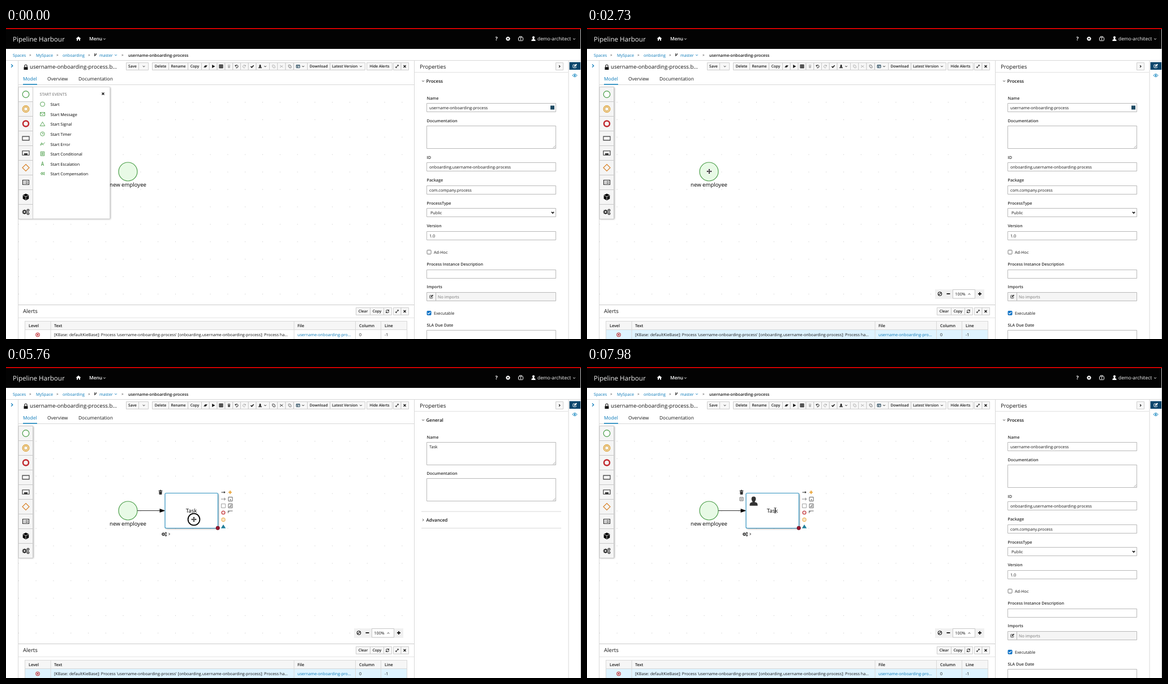
Write an HTML page with a canvas that moves like this. It is 1016 px wide and 551 px high and loops after 8 s.

```html
<!DOCTYPE html>
<html lang="en">
<head>
<meta charset="utf-8">
<title>Process designer</title>
<style>
html, body { margin: 0; width: 100%; height: 100%; overflow: hidden; background: #fff; }
canvas { display: block; width: 1016px; height: 551px; }
</style>
</head>
<body>
<canvas id="stage" width="1016" height="551"></canvas>
<script>
const ctx = document.getElementById('stage').getContext('2d');
const LOOP = 8000;
const INK = '#161616', GREY = '#bbb', LINK = '#0878b8', BLUE = '#1b8ac2';
const GREEN = '#4b9e49', ORANGE = '#e9a02c', RED = '#c0272d';
ctx.textRendering = 'geometricPrecision';

// --- helpers ---
function text(s, x, cy, { size = 7.2, color = INK, weight = 400, align = 'left' } = {}) {
  ctx.font = `${weight} ${size}px "Open Sans", "Noto Sans", sans-serif`;
  ctx.textAlign = align;
  ctx.fillStyle = color;
  ctx.fillText(s, x, cy + size * 0.36);
}
function fill(x, y, w, h, color) {
  ctx.fillStyle = color;
  ctx.fillRect(x, y, w, h);
}
function box(x, y, w, h, { bg, line, r = 0, lw = 1 } = {}) {
  ctx.beginPath();
  ctx.roundRect(x, y, w, h, r);
  if (bg) { ctx.fillStyle = bg; ctx.fill(); }
  if (line) { ctx.strokeStyle = line; ctx.lineWidth = lw; ctx.stroke(); }
}
function shadow(draw, blur = 3, color = 'rgba(0,0,0,.4)') {
  ctx.save();
  ctx.shadowColor = color;
  ctx.shadowBlur = blur;
  ctx.shadowOffsetX = ctx.shadowOffsetY = 1.2;
  draw();
  ctx.restore();
}
function icon(x, y, d, { line, bg, lw = 1, dash = [], scale = 1 } = {}) {
  const path = new Path2D(d);
  ctx.save();
  ctx.translate(x, y);
  ctx.scale(scale, scale);
  ctx.setLineDash(dash);
  if (bg) { ctx.fillStyle = bg; ctx.fill(path); }
  if (line) { ctx.strokeStyle = line; ctx.lineWidth = lw; ctx.stroke(path); }
  ctx.restore();
}
function ring(x, y, r, line, lw = 1, bg) {
  ctx.beginPath();
  ctx.arc(x, y, r, 0, Math.PI * 2);
  if (bg) { ctx.fillStyle = bg; ctx.fill(); }
  if (line) { ctx.strokeStyle = line; ctx.lineWidth = lw; ctx.stroke(); }
}
const hline = (x0, x1, y, color = '#d8d8d8') => fill(x0, y, x1 - x0, 1, color);
const vline = (x, y0, y1, color = '#d8d8d8') => fill(x, y0, 1, y1 - y0, color);

const D = {
  down: 'M-1.8-.9 0 .9 1.8-.9',
  up: 'M-1.8.9 0-.9 1.8.9',
  right: 'M-.9-1.9.9 0-.9 1.9',
  home: 'M-4.5 0 0-4 4.5 0H3V3.5H1V1H-1V3.5H-3V0Z',
  user: 'M-2-2.2a2 2.2 0 1 1 4 0C2-.8 1 0 1 .7 3.3 1.2 3.6 2 3.6 4H-3.6C-3.6 2-3.3 1.2-1 .7-1 0-2-.8-2-2.2Z',
  trash: 'M-3.4-3.2H-1.2V-4.2H1.2V-3.2H3.4V-2.1H-3.4ZM-2.8-1.4H2.8L2.3 4H-2.3Z',
  close: 'M-2-2 2 2M2-2-2 2',
  expand: 'M-2.2 2.2 2.2-2.2M.4-2.2H2.2V-.4M-2.2.4V2.2H-.4',
  check: 'M-2.6 0-.8 1.8 2.6-1.8',
  plus: 'M-3 0H3M0-3V3',
  arrow: 'M-3.5-.5H1V-2L3.8 0 1 2V.5H-3.5Z',
  page: 'M-2.4-2.4H.8V-.8H2.4V2.6H-.8V.8H-2.4Z',
  rows: 'M-3-3H3V3H-3ZM-1.6-1H1.6M-1.6 1H1.6',
  list: 'M-5.5-4H5.5V4H-5.5ZM-3.5-1.5H-2.2M-.8-1.5H3.7M-3.5 1.4H-2.2M-.8 1.4H3.7',
  note: 'M-4 2V-2H4M-2.5 0V-2',
  undo: 'M-2.3-2.4V-.5H-.4M-2.2-.6A2.4 2.4 0 1 1-1.5 1.9',
  redo: 'M2.3-2.4V-.5H.4M2.2-.6A2.4 2.4 0 1 0 1.5 1.9'
};

function gear(x, y, r, color = INK, hole = '#fff') {
  ctx.strokeStyle = color;
  ctx.lineWidth = r * 0.45;
  for (let i = 0; i < 8; i++) {
    const a = i * Math.PI / 4;
    ctx.beginPath();
    ctx.moveTo(x, y);
    ctx.lineTo(x + Math.cos(a) * r, y + Math.sin(a) * r);
    ctx.stroke();
  }
  ring(x, y, r * 0.75, null, 0, color);
  ring(x, y, r * 0.36, null, 0, hole);
}
function gears(x, y, s = 1) {
  gear(x - 1.8 * s, y + .3 * s, 3.3 * s, '#333');
  gear(x + 3.2 * s, y - 2 * s, 2 * s, '#333');
  gear(x + 3.2 * s, y + 2.6 * s, 2 * s, '#333');
}
function pencil(x, y, color, scale = 1) {
  icon(x, y, 'M.6-2.4H-2.2Q-3-2.4-3-1.6V2Q-3 2.8-2.2 2.8H1.6Q2.4 2.8 2.4 2V.8', { line: color, lw: .9, scale });
  icon(x, y, 'M-1.2 1.2-.9-.6 2.3-3.8 3.8-2.3.6.9Z', { bg: color, scale });
}

// --- page chrome ---
function header() {
  fill(0, 0, 1016, 37, '#030303');
  fill(0, 0, 1016, 1.9, '#d10000');
  text('Pipeline Harbour', 12, 19.5, { size: 11.6, color: '#f2f2f2' });
  icon(128, 19, D.home, { bg: '#fff' });
  text('Menu', 147, 19, { size: 8.4, color: '#fff', weight: 600 });
  icon(174, 19.5, D.down, { line: '#fff' });
  text('?', 864.5, 19, { size: 9, color: '#fff', weight: 700 });
  gear(887, 19, 3.8, '#fff', '#030303');
  box(905.5, 16.5, 8, 6, { line: '#fff', r: 1 });
  box(907.5, 15, 4, 1.5, { line: '#fff', lw: .8 });
  icon(909.5, 19.5, D.plus, { line: '#fff', scale: .6 });
  icon(932, 19, D.user, { bg: '#fff' });
  text('demo-architect', 939, 19, { size: 8.4, color: '#fff' });
  icon(1004, 19.5, D.down, { line: '#fff' });
}
function breadcrumbs() {
  for (const [s, x] of [['Spaces', 12], ['MySpace', 53], ['onboarding', 100], ['master', 165]])
    text(s, x, 48, { color: LINK });
  for (const x of [41, 89, 145, 204]) text('»', x, 47.5, { color: '#555' });
  icon(158, 47.5, 'M-1.3-2.6V2.6M-1.3 1.2C1.3 1 1.5-.5 1.5-2.4', { line: '#333', lw: 1.2 });
  icon(194, 48, D.down, { line: LINK, lw: .9 });
  text('username-onboarding-process', 216, 48, { weight: 600 });
  hline(0, 1016, 57);
}
function button(x0, x1, y, label, textX) {
  box(x0 + .5, y + .5, x1 - x0, 13, { bg: '#f7f7f7', line: '#c4c4c4', lw: .8 });
  if (label) text(label, textX ?? (x0 + x1) / 2 + .5, y + 7, { size: 6.6, weight: 600, align: textX ? 'left' : 'center' });
}
function toolbar(selected) {
  icon(35, 70, 'M-3.5-.8H3.5V4H-3.5Z', { bg: INK });
  icon(35, 69, 'M-2 .5V-2a2 2 0 0 1 4 0V.5', { line: INK, lw: 1.2 });
  text('username-onboarding-process.b...', 42, 68.5, { size: 9.6 });

  button(212, 234, 61, 'Save');
  button(234, 251, 61);
  button(258, 287, 61, 'Delete');
  button(287, 321, 61, 'Rename');
  button(321, 345, 61, 'Copy');
  for (let i = 0; i < 7; i++) button(345 + i * 13.8, 358.8 + i * 13.8, 61);
  button(441.6, 465, 61);
  for (let i = 0; i < 3; i++) button(465 + i * 14.2, 479.2 + i * 14.2, 61);
  button(508, 532, 61);
  button(532, 572, 61, 'Download');
  button(572, 634, 61, 'Latest Version', 576);
  button(637, 682, 61, 'Hide Alerts');
  button(684, 697.5, 61);
  button(697.5, 711, 61);

  const active = selected ? '#555' : GREY;
  for (const x of [243.5, 458, 525, 627]) icon(x, 68, D.down, { line: INK, lw: .9 });
  icon(352.5, 68, 'M-3.3 1.8-.8-1.8H3.3L.8 1.8Z', { bg: INK });
  icon(366.5, 68, 'M-2.4-3 3 0-2.4 3Z', { bg: INK });
  icon(380, 68, 'M-3-2.6H3V2.6H-3ZM-3 0H3M-1-2.6V2.6M1-2.6V2.6', { line: INK, lw: 1.1 });
  icon(394, 68, D.trash, { bg: active, scale: .75 });
  icon(407.5, 68, D.undo, { line: INK });
  icon(421, 68, D.redo, { line: '#aaa' });
  icon(435, 68, D.check, { line: INK, lw: 1.5 });
  icon(449, 68, 'M-1-3H1V-.5H2.5L0 2-2.5-.5H-1ZM-3 1.8H3V3H-3Z', { bg: INK });
  icon(473, 68, D.page, { line: active });
  icon(487, 68, 'M-2.3-2 2.5 2M-2.3 2 2.5-2M-3-1.2h1.4M-3 1.2h1.4', { line: active });
  icon(501.5, 68, D.page, { line: '#888' });
  icon(516, 68, 'M-3-2.4H3V2.4H-3ZM-3-.8H3M-.8-.8V2.4', { line: '#24475c' });
  icon(691, 68, D.expand, { line: INK });
  icon(704.5, 68, D.close, { line: INK, lw: 1.3 });

  text('Model', 30, 90, { size: 8.4, color: LINK });
  text('Overview', 73, 90, { size: 8.4 });
  text('Documentation', 128, 90, { size: 8.4 });
  hline(22, 721, 100);
  fill(30, 99, 25, 1.6, BLUE);
}
function sideStrips() {
  icon(10.5, 67, 'M-1.3-2.6 1.3 0-1.3 2.6', { line: LINK, lw: 1.3 });
  vline(21, 58, 551);
  vline(721, 58, 551);
  vline(993.5, 58, 551);
  fill(995.5, 60.5, 19.5, 13.5, '#0b456b');
  pencil(1005, 67.5, '#fff', 1.05);
  icon(1005, 84, 'M-4 0C-2-3.3 2-3.3 4 0 2 3.3-2 3.3-4 0Z', { line: BLUE });
  ring(1005, 84, 1.5, null, 0, BLUE);
  vline(1015, 2, 551, '#c4c4c4');
}
function alerts(hover) {
  fill(22, 490, 699, 61, '#fff');
  hline(22, 721, 490, '#ccc');
  text('Alerts', 30, 502, { size: 9.6 });
  button(618, 643, 495, 'Clear');
  button(643, 667, 495, 'Copy');
  button(667, 681, 495);
  button(684, 697.5, 495);
  button(697.5, 711, 495);
  icon(674, 502, 'M-2.6-.3A2.6 2.6 0 0 1 2-1.6M2.4-3V-1H.4M2.6.3A2.6 2.6 0 0 1-2 1.6M-2.4 3V1H-.4', { line: INK });
  icon(691, 502, D.expand, { line: INK });
  icon(704.5, 502, D.close, { line: INK, lw: 1.3 });
  hline(22, 721, 513, '#e4e4e4');
  fill(33, 519, 675, 15, '#f6f6f6');
  if (hover) fill(33, 535, 675, 16, '#def3ff');
  hline(33, 708, 519);
  hline(33, 708, 534);
  for (const x of [33, 78.5, 508.5, 617, 662, 708]) vline(x, 519, 551);
  for (const [s, x] of [['Level', 40], ['Text', 85], ['File', 515], ['Column', 624], ['Line', 669]])
    text(s, x, 527, { weight: 600 });
  ring(56, 543.5, 3.2, RED, 1.1);
  ring(56, 543.5, 1.4, null, 0, RED);
  text("[KBase: defaultKieBase]: Process 'username-onboarding-process' [onboarding.username-onboarding-process]: Process ha...", 85, 543.5);
  text('username-onboarding-pro...', 515, 543.5, { color: LINK });
  text('0', 624, 543.5);
  text('-1', 669, 543.5);
}

// --- properties panel ---
const label = (s, cy) => text(s, 743.5, cy, { weight: 600, color: '#2b2b2b' });
const input = (y, h, value = '', bg = '#fff') => {
  box(743.5, y + .5, 228, h, { bg, line: '#b9b9b9' });
  if (value) text(value, 748, y + 8.2);
};
function area(y, h, value) {
  input(y, h, value);
  icon(969, y + h - 2, 'M-2.5 1.5 1.5-2.5M0 1.5 1.5 0', { line: '#888', lw: .7 });
}
function section(s, cy, open) {
  icon(737, cy, open ? D.down : D.right, { line: '#333', lw: .9 });
  text(s, 742.5, cy, { size: 8, weight: 600 });
}
function checkbox(s, cy, on) {
  box(744, cy - 3.5, 7, 7, { bg: on ? '#1575c6' : '#fff', line: on ? '#1575c6' : '#777', r: 1 });
  if (on) icon(747.5, cy, D.check, { line: '#fff', lw: 1.2, scale: .9 });
  text(s, 756, cy);
}
function processPanel(badge) {
  section('Process', 94, true);
  label('Name', 124);
  input(133, 15, 'username-onboarding-process');
  if (badge) fill(962, 137.5, 7, 7, '#1d4a63');
  label('Documentation', 164);
  area(173, 40);
  label('ID', 229);
  input(238, 15, 'onboarding.username-onboarding-process');
  label('Package', 269);
  input(279, 15, 'com.company.process');
  label('ProcessType', 310);
  input(319, 15);
  text('Public', 750, 327);
  icon(966, 327, D.down, { line: INK, lw: 1.3, scale: 1.2 });
  label('Version', 350);
  input(360, 15, '1.0');
  checkbox('Ad-Hoc', 397);
  label('Process Instance Description', 418);
  input(428, 15);
  label('Imports', 458.5);
  input(468, 15, '', '#f5f5f5');
  vline(759, 468, 484, '#b9b9b9');
  pencil(751.5, 476, '#333', .95);
  text('No imports', 763, 476, { color: '#777' });
  checkbox('Executable', 505, true);
  label('SLA Due Date', 526);
  input(535, 17);
}
function generalPanel(name, sections) {
  section('General', 94, true);
  label('Name', 124);
  area(133, 40, name);
  label('Documentation', 188.5);
  area(197, 40);
  hline(734, 981, 255.5);
  sections.forEach((s, i) => {
    section(s, 271 + i * 29.5);
    hline(734, 981, 285 + i * 29.2);
  });
}
function properties(state) {
  text('Properties', 731, 68.5, { size: 9.6 });
  hline(722, 993, 78, '#e0e0e0');
  button(971, 984, 61);
  icon(978, 68, D.right, { line: INK, lw: 1.2 });
  if (state === 'start') generalPanel('new employee', ['Implementation/Execution', 'Advanced']);
  else if (state === 'task') generalPanel('Task', ['Advanced']);
  else processPanel(state === 'process');
}

// --- palette ---
const startEvents = ['', ' Message', ' Signal', ' Timer', ' Error', ' Conditional', ' Escalation', ' Compensation'];
const startIcons = [
  'M-4 0A4 4 0 1 1 4 0 4 4 0 1 1-4 0',
  'M-4-3H4V3H-4ZM-4-2.6 0 .7 4-2.6',
  'M0-3.8 4.2 3.3H-4.2Z',
  'M-3.6 0A3.6 3.6 0 1 1 3.6 0 3.6 3.6 0 1 1-3.6 0M0-2V0H2',
  'M-4 2.5-1.5-2 1 1 4-2.5M-3 3 -1 0 1.5 2.5',
  'M-3.3-3.5H3.3V3.5H-3.3ZM-2-1.6H2M-2 0H2M-2 1.6H2',
  'M-2 3.5 0-3.5 2 3.5 0 .7Z',
  'M-.5-2.5V2.5L-3.5 0ZM3-2.5V2.5L0 0Z'
];
function palette(open) {
  shadow(() => box(22, 104, open ? 162 : 26, 234, { bg: open ? '#fff' : '#f5f5f5' }));
  if (open) {
    box(22, 104.5, 161.5, 233.5, { line: '#d0d0d0', lw: .8 });
    text('START EVENTS', 59.5, 117.5, { color: '#666' });
    icon(171.5, 116.5, D.close, { line: INK, lw: 1.4 });
    startEvents.forEach((s, i) => {
      const y = 135.5 + i * 17.55;
      icon(64.5, y - .5, startIcons[i], { line: GREEN, lw: .9 });
      text('Start' + s, 78.5, y + .3, { color: '#000' });
    });
  }
  for (let i = 0; i < 9; i++)
    box(22, 104.5 + i * 26, 25.5, 26, { bg: open && !i ? '#fff' : '#f5f5f5', line: '#c6c6c6', lw: .9 });
  const y = i => 117.5 + i * 26;
  ring(35, y(0), 5.8, GREEN, 1.2, '#fff');
  ring(35, y(1), 5.8, '#dc9a22', 1.2);
  ring(35, y(1), 3.6, '#dc9a22', 1.2);
  ring(35, y(2), 5, RED, 2.5);
  icon(35, y(3), 'M-6-3.4H6V3.4H-6Z', { line: '#333', lw: 1.1 });
  icon(35, y(4), 'M-6-3.8H6V3.8H-6Z', { line: '#333', lw: 1.1 });
  fill(32, y(4) + .6, 6, 2.6, '#222');
  icon(35, y(5), 'M0-6 6 0 0 6-6 0Z', { line: '#d9832b', lw: 1.2 });
  icon(35, y(6), D.list, { line: '#333', lw: 1.2 });
  icon(35, y(7), 'M0-6 5.3-3.5V3L0 6-5.3 3V-3.5Z', { bg: '#050505' });
  icon(35, y(7), 'M-5-3 0-.8 5-3M0-.8V5.5', { line: '#f5f5f5', lw: .8 });
  gears(35, y(8), 1.25);
}
function zoomBar() {
  fill(615, 463, 87, 17, '#f1f1f1');
  ring(623.5, 471, 3.2, INK, 1.1);
  icon(623.5, 471, 'M-2.2 2.2 2.2-2.2', { line: INK, lw: 1.1 });
  fill(635.5, 470, 6, 1.8, INK);
  box(646.5, 463.5, 39, 15.5, { bg: '#fff', line: '#bbb', lw: .8 });
  text('100%', 650.5, 471.5);
  icon(675.5, 471.5, D.up, { line: INK, lw: .9 });
  icon(694, 471, D.plus, { line: INK, lw: 1.8 });
}

// --- diagram ---
function grid() {
  for (let y = 131; y < 488; y += 30.9)
    for (let x = 21.8; x < 720; x += 30.8) fill(x, y, 1, 1, '#c3c3c3');
}
function startNode(selected) {
  if (selected) shadow(() => ring(215.5, 254.5, 16.5, null, 0, '#e8fae6'));
  ring(215.5, 254.5, 16.5, selected ? BLUE : GREEN, selected ? 1.5 : 1.2, '#e8fae6');
  text('new employee', 215.5, 278, { size: 9.6, color: '#000', align: 'center' });
}
const miniBox = (x, y, line = '#555') => box(x - 3.5, y - 3.5, 7, 7, { line, lw: .9 });
const dashArrow = (x, y) => {
  icon(x, y, 'M-3.8 0H2', { line: '#555', lw: 1, dash: [1.5, .8] });
  icon(x, y, 'M1.2-2 3.8 0 1.2 2', { line: '#555', lw: .9 });
};
const plus = (x, y) => icon(x, y, D.plus, { line: ORANGE, lw: 1.7 });
function clock(x, y) {
  ring(x, y, 3.3, ORANGE, 1);
  ring(x, y, 1.6, ORANGE, .6);
}
function startTools() {
  icon(191, 236, D.trash, { bg: '#333' });
  icon(243, 236, D.arrow, { bg: '#333' });
  ring(255, 236, 2.8, '#cb5255', 1.6);
  plus(267, 236);
  icon(279, 235, D.note, { line: '#555', lw: .9 });
  dashArrow(243, 248);
  clock(255, 248);
  miniBox(267, 248);
  fill(266.3, 248.5, 1.5, 1.5, '#333');
  miniBox(243, 260.5);
  icon(255, 260.5, 'M0-3.5 4 3H-4Z', { bg: '#217f9b' });
  gears(197, 282, .9);
  icon(206, 282, D.right, { line: INK });
}
function taskNode(user) {
  hline(232, 274, 254, '#333');
  icon(281.5, 254.5, 'M0 0-10-3.5V3.5Z', { bg: '#000' });
  shadow(() => box(281, 223.5, 93.5, 62, { bg: '#fff', r: 2 }));
  box(281, 223.5, 93.5, 62, { line: '#3496c4', r: 2, lw: 1.2 });
  if (user) icon(294.5, 238, D.user, { bg: '#333', scale: 1.95 });
  text('Task', 327.5, 254.3, { size: 9.6, color: '#000', align: 'center' });
}
function taskTools(user, menuOpen) {
  icon(273, 222, D.trash, { bg: '#333' });
  if (user) icon(273, 234, D.rows, { line: '#666', lw: .9 });
  ring(374.2, 285.3, 3.2, '#5d0d1d', .8, '#9b1730');
  icon(384, 222, D.arrow, { bg: '#333' });
  plus(396, 222);
  dashArrow(384, 234);
  miniBox(396.5, 234);
  fill(395.8, 234.5, 1.5, 1.5, '#333');
  miniBox(384, 246, '#999');
  miniBox(396.5, 246);
  icon(396.5, 246, 'M-2 2 2-2M0 2 2 0', { line: '#333' });
  ring(384, 258, 2.8, '#cb5255', 1.6);
  icon(396.5, 257, D.note, { line: '#555', lw: .9 });
  clock(384, 270.5);
  icon(384, 282.5, 'M0-3.6 4.2 3.2H-4.2Z', { bg: '#217f9b' });
  if (!menuOpen) {
    gears(279.5, 296, .9);
    icon(288.5, 296, D.right, { line: INK });
    return;
  }
  box(273.5, 290, 12.5, 12, { bg: '#f4f4f4', line: '#777', r: 1 });
  gears(279.5, 296, .9);
  box(287.5, 289.5, 62.5, 13, { bg: '#f4f4f4', line: '#888', r: 1 });
  miniBox(294.5, 296);
  fill(293.8, 296, 1.5, 1.5, '#333');
  box(301.5, 290.5, 10.5, 11, { bg: '#ddd', line: '#666', lw: .9 });
  icon(306.5, 296, D.user, { bg: '#444', scale: .9 });
  icon(318.5, 296, 'M-3.4-2.8H3.4V2.8H-3.4ZM-3.4-1H3.4M-1-2.8V2.8M-3.4 1H3.4', { line: '#555', lw: .9 });
  icon(330.5, 296, 'M-2-3.2H3.4L2 3.2H-3.4ZM-1.2-1H1.6M-1.8 1H1.2', { line: '#555', lw: .9 });
  gear(342.5, 296, 4.4, '#444', '#f4f4f4');
}
function tooltip(s, x, y, w) {
  if (w <= 0) return;
  box(x, y, w, 14, { bg: '#272727', r: 2 });
  ctx.save();
  ctx.beginPath();
  ctx.rect(x + 1, y, w - 2, 14);
  ctx.clip();
  text(s, x + w / 2, y + 7.2, { size: 8.8, color: '#fff', align: 'center' });
  ctx.restore();
}

// --- pointer ---
const route = [
  [540, 236, 560], [1180, 211, 258], [1350, 211, 258], [2070, 171, 117], [2190, 171, 117],
  [2700, 216, 254], [3270, 216, 254], [3840, 243, 262], [5100, 243, 262], [5700, 332, 270],
  [5910, 332, 270], [6600, 281, 297], [6720, 281, 297], [6800, 308, 301], [6990, 308, 301], [7470, 332.5, 254]
];
const ramp = (t, a, b) => Math.min(1, Math.max(0, (t - a) / (b - a)));
const ease = k => k * k * (3 - 2 * k);
function pointerAt(t) {
  let i = 0;
  while (i < route.length - 2 && t > route[i + 1][0]) i++;
  const [t0, x0, y0] = route[i], [t1, x1, y1] = route[i + 1];
  const k = ease(ramp(t, t0, t1));
  return [x0 + (x1 - x0) * k, y0 + (y1 - y0) * k];
}
const outlined = (x, y, d) => {
  icon(x, y, d, { line: '#fff', lw: 1.6 });
  icon(x, y, d, { bg: '#000' });
};
const shapes = {
  arrow: (x, y) => outlined(x, y, 'M0 0V8.2L1.9 6.5 3.2 9.4 4.5 8.8 3.2 6H5.8Z'),
  move: (x, y) => outlined(x, y, 'M0-4.6 1.7-2.7H.6V-.6H2.7V-1.7L4.6 0 2.7 1.7V.6H.6V2.7H1.7L0 4.6-1.7 2.7H-.6V.6H-2.7V1.7L-4.6 0-2.7-1.7V-.6H-.6V-2.7H-1.7Z'),
  hand: (x, y) => icon(x, y, 'M-1.6-3.2c0-1 1.5-1 1.5 0V0L3.4.8C4.4 1 4.5 2 4.2 3L3.4 6H-.8L-3.3 2.4C-3.8 1.3-2.6 1-1.6 2Z', { line: '#000', bg: '#fff', lw: .9 }),
  beam: (x, y) => {
    const d = 'M-1.8-4.5Q0-4.5 0-3.4 0-4.5 1.8-4.5M0-3.4V3.6M-1.8 4.7Q0 4.7 0 3.6 0 4.7 1.8 4.7M-1 1H1';
    icon(x, y, d, { line: '#fff', lw: 2 });
    icon(x, y, d, { line: '#000', lw: .9 });
  }
};
function pointer(t) {
  if (t < 540) return;
  const [x, y] = pointerAt(t);
  let kind = 'arrow';
  if (t > 2030 && t < 2220) kind = 'hand';
  else if (t >= 7400) kind = 'beam';
  else if (t >= 7200) kind = 'move';
  else if (t >= 6480) kind = 'hand';
  else if (t >= 5400 && t < 6240) kind = 'move';
  else if (t >= 3690 && t < 5160) kind = 'hand';
  else if (t >= 2550 && t < 3510) kind = 'move';
  if (t >= 5700 && t < 5880) ring(x, y, 10.4, '#000', 1.8, 'rgba(255,255,255,.6)');
  shapes[kind](x, y);
}

// --- timeline ---
const CLOSE = 2160, SELECT = 3000, CREATE = 4500, CONVERT = 7110;
function panelState(t) {
  if (t < SELECT) return 'process';
  if (t < CREATE) return 'start';
  return t < CONVERT ? 'task' : 'converted';
}
function render(t) {
  const created = t >= CREATE, user = t >= CONVERT;
  const selected = t >= SELECT && !user;
  fill(0, 0, 1016, 551, '#fff');
  header();
  breadcrumbs();
  grid();
  sideStrips();
  toolbar(selected);
  startNode(selected && !created);
  if (t >= 3060 && !created) {
    startTools();
    if (t >= 3750) {
      box(237.5, 254.5, 11, 12, { line: '#5964b5', r: 1 });
      const k = ramp(t, 3780, 3870);
      if (k > 0) icon(256, 260.5, 'M0-3.5V3.5L-5 0Z', { bg: '#272727' });
      tooltip('Create Task', 256, 253.5, 54 * k);
    }
  }
  if (created) {
    taskNode(user);
    if (t >= 4710) taskTools(user, t >= 6480 && !user);
    if (!user && t >= 6800) {
      const w = 8 + 94 * ramp(t, 6825, 6930);
      icon(306.5, 306, 'M-3 1 0-3 3 1Z', { bg: '#272727' });
      tooltip('Convert into User Task', 306.5 - w / 2, 306, w);
    }
  }
  palette(t < CLOSE);
  if (t >= CLOSE) zoomBar();
  alerts(t >= 600);
  properties(panelState(t));
  pointer(t);
}
function tick(now) {
  render(now % LOOP);
  requestAnimationFrame(tick);
}
requestAnimationFrame(tick);
</script>
</body>
</html>
```
